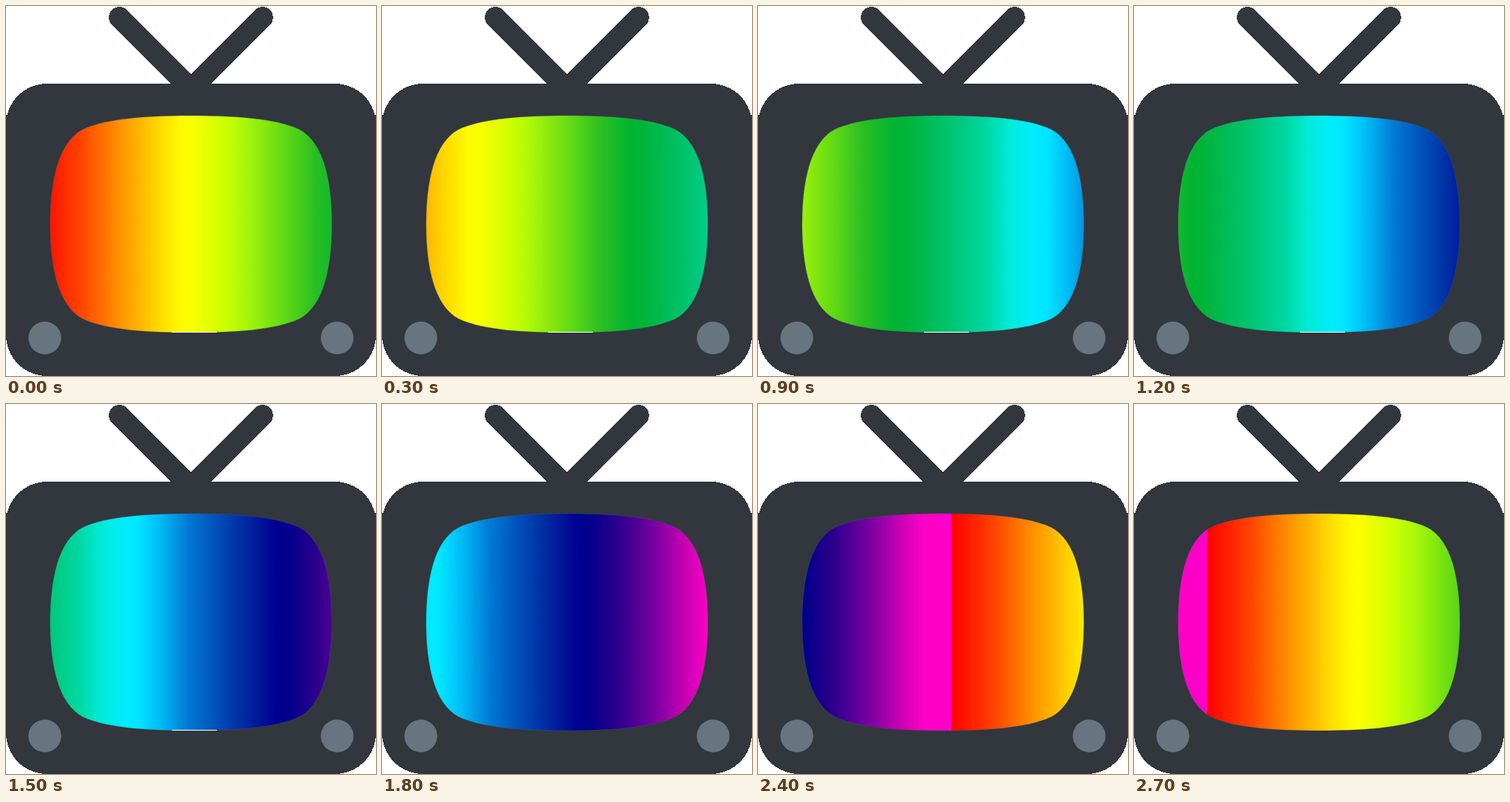
These frames come from a looping animation (486 by 486 pixels, 3 s). An HTML page:

```html
<!DOCTYPE html>
<html lang="en">
<head>
<meta charset="utf-8">
<title>Rainbow television</title>
<style>
  html, body { margin: 0; width: 100%; height: 100%; overflow: hidden; background: #fff; }
  svg { display: block; width: 486px; height: 486px; }
</style>
</head>
<body>
<svg viewBox="0 0 486 486">
  <defs>
    <linearGradient id="rainbow" gradientUnits="userSpaceOnUse" x1="0" y1="0" x2="994" y2="0" spreadMethod="repeat"></linearGradient>
  </defs>
  <g fill="#31373d" shape-rendering="crispEdges">
    <path d="M149 15L243 109L337 15" fill="none" stroke="#31373d" stroke-width="27.5" stroke-linecap="round"/>
    <rect y="102" width="486" height="384" rx="54"/>
    <rect y="143" width="486" height="286"/>
  </g>
  <path id="screen" fill="url(#rainbow)" stroke="#4b6573" stroke-opacity=".35" stroke-width=".8"
    d="M58 286.5C58 232 68 179 101 162C133 147 190 144 243 144C296 144 353 147 385 162C418 179 428 232 428 286.5C428 341 418 394 385 411C353 426 296 429 243 429C190 429 133 426 101 411C68 394 58 341 58 286.5Z"/>
  <rect id="glint" x="218" y="428" width="59" height="1" fill="#fff"/>
  <g fill="#66757f">
    <circle cx="51" cy="436" r="21.5"/>
    <circle cx="435" cy="436" r="21.5"/>
  </g>
</svg>
<script>
  const STEP = 300;
  const WIDTH = 994;
  // Left end of the colour strip at each step
  const shifts = [41, -76, -151, -226, -328, -431, -528, -626, -740, -898];
  const GLINT_STEPS = 6;

  const stops = [
    [0, '#ff0000'], [54, '#ff4000'], [104, '#ff8c00'], [154, '#ffd200'],
    [188, '#fffa00'], [202, '#faff00'], [249, '#c8ff00'], [276, '#a5f50a'],
    [326, '#5fd914'], [366, '#28be23'], [405, '#00b432'], [420, '#00b43a'],
    [476, '#00c36e'], [526, '#00d7a0'], [556, '#00ebd7'], [590, '#00ebff'],
    [604, '#00e6ff'], [631, '#00bef8'], [671, '#0078d2'], [731, '#0037a8'],
    [785, '#00008f'], [802, '#02008c'], [836, '#28008c'], [886, '#7800a0'],
    [926, '#c800b4'], [958, '#ff00c8'], [WIDTH, '#ff00c8']
  ];

  const rainbow = document.getElementById('rainbow');
  const glint = document.getElementById('glint');

  for (const [x, color] of stops) {
    const stop = document.createElementNS('http://www.w3.org/2000/svg', 'stop');
    stop.setAttribute('offset', x / WIDTH);
    stop.setAttribute('stop-color', color);
    rainbow.append(stop);
  }

  function draw(time) {
    const i = Math.floor(time / STEP) % shifts.length;
    rainbow.setAttribute('gradientTransform', `translate(${shifts[i]} 0)`);
    glint.setAttribute('visibility', i < GLINT_STEPS ? 'visible' : 'hidden');
  }

  const start = performance.now();
  function tick() {
    draw(performance.now() - start);
    requestAnimationFrame(tick);
  }
  tick();
</script>
</body>
</html>
```
